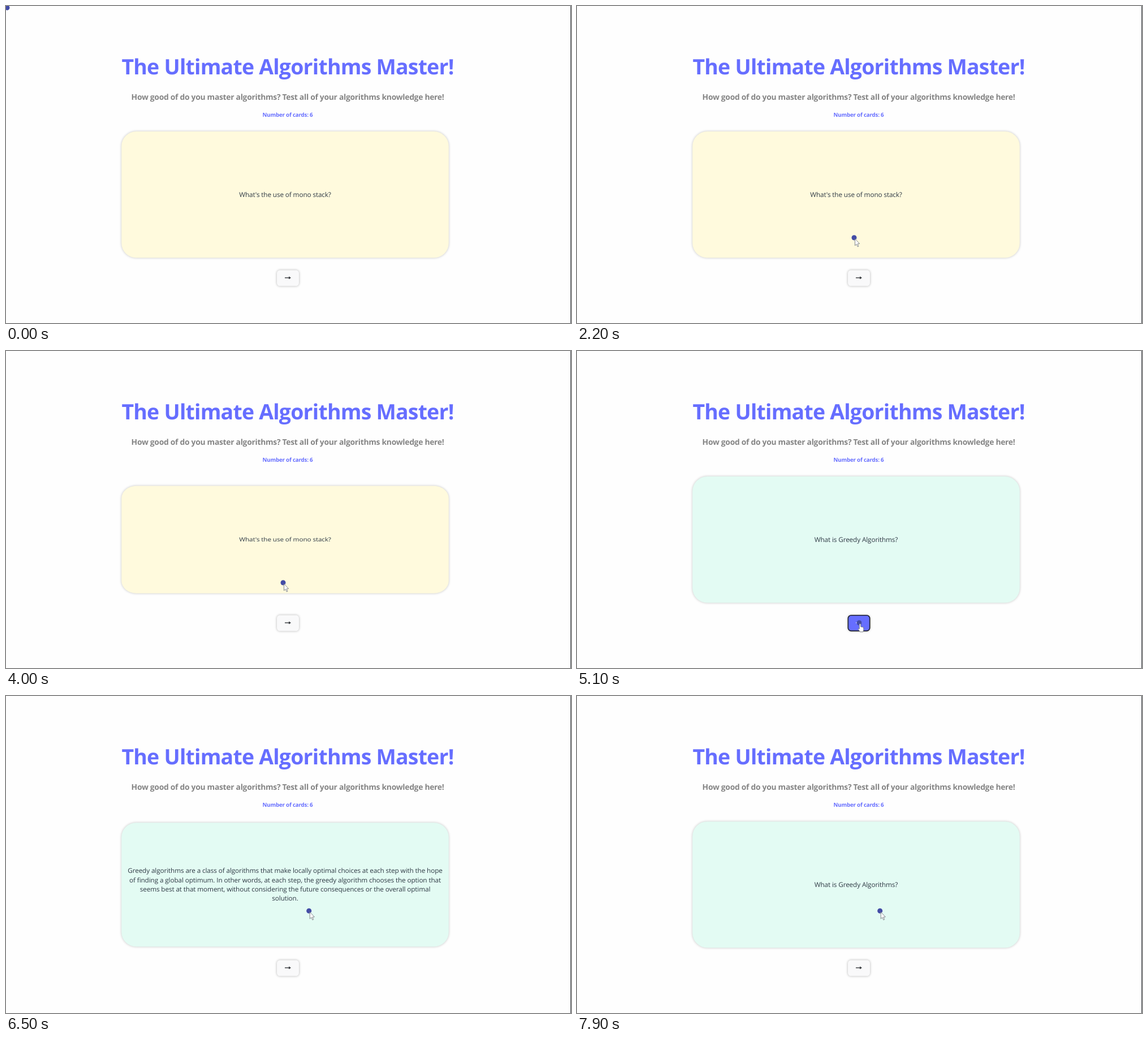
Write an HTML page with a canvas that moves like this. It is 999x561 px and loops after 8 s.

```html
<!DOCTYPE html>
<html lang="en">
<head>
<meta charset="utf-8">
<title>Flashcards</title>
<style>
html, body { margin: 0; width: 100%; height: 100%; overflow: hidden; background: #fefefe; }
canvas { display: block; width: 999px; height: 561px; }
</style>
</head>
<body>
<canvas id="stage"></canvas>
<script>
const W = 999, H = 561, LOOP = 8000, FLIP = 550, BLINK = 500;
const canvas = document.getElementById('stage');
const ctx = canvas.getContext('2d');
const dpr = window.devicePixelRatio || 1;
canvas.width = Math.round(W * dpr);
canvas.height = Math.round(H * dpr);

const FONT = '"Open Sans", "Noto Sans", sans-serif';
const PURPLE = '#666eff', INK = '#2f3a45';
const MID_X = 493.5, MID_Y = 333.8, LINE = 16.7;
const CARD_W = 578.5, CARD_H = 223.5;

// Timeline in ms
const APPEAR = 150, NEXT_CARD = 5050;
const flips = [2470, 3714, 6120, 7430];
const hovers = [[1150, 1760], [4560, 5570]];
const focus = [4780, 5950];
const moves = [
  { from: 340, to: 700, x: 631, y: 365 },
  { from: 830, to: 1320, x: 502, y: 483 },
  { from: 1690, to: 2200, x: 491.5, y: 412 },
  { from: 4320, to: 4780, x: 500.5, y: 483 },
  { from: 5540, to: 5790, x: 537.2, y: 382.3 }
];
const carets = [
  { from: 2400, to: 4700, atEnd: false },
  { from: 6980, to: 7180, atEnd: false },
  { from: 7180, to: LOOP, atEnd: true }
];

const cards = [
  {
    fill: '#fffadd',
    front: ["What's the use of mono stack?"],
    back: [
      'A monotonic stack is a data structure that can be used to solve a variety of problems involving finding',
      'the next greater element, next smaller element, or similar problems that require identifying the nearest',
      'element with some specific property. A monotonic stack is a stack that either maintains a non-',
      'decreasing or a non-increasing order of its elements.'
    ],
    backY: 278.3,
    picture: stackPicture
  },
  {
    fill: '#e3fbf3',
    front: ['What is Greedy Algorithms?'],
    back: [
      'Greedy algorithms are a class of algorithms that make locally optimal choices at each step with the hope',
      'of finding a global optimum. In other words, at each step, the greedy algorithm chooses the option that',
      'seems best at that moment, without considering the future consequences or the overall optimal',
      'solution.'
    ],
    backY: MID_Y
  }
];

const clamp = v => Math.max(0, Math.min(1, v));
const mix = (a, b, k) => a + (b - a) * k;
const easeOut = k => 1 - (1 - clamp(k)) ** 2;

// The CSS "ease" curve
function ease(x) {
  if (x <= 0 || x >= 1) return clamp(x);
  const bez = (a, b, s) => 3 * a * s * (1 - s) ** 2 + 3 * b * s * s * (1 - s) + s ** 3;
  let lo = 0, hi = 1;
  for (let i = 0; i < 24; i++) {
    const s = (lo + hi) / 2;
    if (bez(0.25, 0.25, s) < x) lo = s; else hi = s;
  }
  return bez(0.1, 1, lo);
}

function pointerAt(t) {
  if (t < APPEAR) return { x: 3.5, y: 5 };
  return moves.reduce((p, m) => {
    const k = easeOut((t - m.from) / (m.to - m.from));
    return { x: mix(p.x, m.x, k), y: mix(p.y, m.y, k) };
  }, { x: 808, y: 114 });
}

function setFont(size, weight, spacing) {
  ctx.font = `${weight} ${size}px ${FONT}`;
  ctx.letterSpacing = `${size * spacing}px`;
  ctx.textRendering = 'geometricPrecision';
  ctx.textAlign = 'center';
}

function text(str, x, y, size, color, weight = 400, spacing = -0.01) {
  setFont(size, weight, spacing);
  ctx.fillStyle = color;
  ctx.fillText(str, x, y);
}

const heading = (str, y, size, color) => text(str, 498, y, size, color, 700, -0.021);

function box(x, y, w, h, r, fill) {
  ctx.fillStyle = fill;
  ctx.beginPath();
  ctx.roundRect(x, y, w, h, r);
  ctx.fill();
}

function panel(x, y, w, h, r, fill, shade) {
  ctx.save();
  ctx.shadowColor = `rgba(0,0,0,${shade})`;
  ctx.shadowBlur = 4 * dpr;
  box(x, y, w, h, r, fill);
  ctx.restore();
}

function paragraph(lines, mid, caret) {
  const lineY = i => mid + (i - (lines.length - 1) / 2) * LINE;
  lines.forEach((s, i) => text(s, MID_X, lineY(i) + 4.2, 11.75, INK));
  if (!caret) return;
  const i = caret.atEnd ? lines.length - 1 : 0;
  const half = ctx.measureText(lines[i]).width / 2;
  box(MID_X + (caret.atEnd ? half : -half) - 0.5, lineY(i) - 7.5, 1, 15, 0, '#222');
}

function numberBar(x, y, values) {
  box(x, y, values.length * 8.7, 8.4, 0, '#1268e8');
  values.forEach((v, i) => text(v, x + (i + 0.5) * 8.7, y + 6, 4.6, '#dce9ff'));
}

// Values pile up from the bottom
function cells(cx, bottom, values, fill, ink) {
  values.forEach((v, i) => {
    const y = bottom - 4.2 - i * 6.9;
    box(cx - 6.8, y - 2.9, 13.6, 5.8, 1, fill);
    text(v, cx, y + 1.6, 4.4, ink);
  });
}

function beaker(x, bottom, values) {
  const top = bottom - Math.max(31, values.length * 6.9 + 3);
  ctx.strokeStyle = '#37659f';
  ctx.lineWidth = 1.2;
  ctx.beginPath();
  ctx.moveTo(x, top);
  ctx.arcTo(x, bottom, x + 8, bottom, 2);
  ctx.arcTo(x + 16.5, bottom, x + 16.5, top, 2);
  ctx.lineTo(x + 16.5, top);
  ctx.stroke();
  cells(x + 8.25, bottom, values, '#31c994', '#164b3b');
}

// Snapshots of an increasing stack after a number of inputs
function stackPicture() {
  const input = [2, 3, 7, 11, 5, 17, 19];
  const shots = [
    { taken: 0, x: 401.5, bottom: 389.6, barX: -3.5, barY: -45.8 },
    { taken: 4, x: 463, bottom: 417.8, barX: -3.5, barY: -46 },
    { taken: 5, x: 506, bottom: 377.2, barX: 19.5, barY: -33.4 },
    { taken: 7, x: 555, bottom: 418.4, barX: 0, barY: 0 }
  ];
  box(395, 322.8, 197, 110.9, 0, '#fff');
  text('Monotonic Stack (Increasing)', 492, 331.3, 4.4, '#333');
  for (const { taken, x, bottom, barX, barY } of shots) {
    const stack = [], popped = [];
    for (const v of input.slice(0, taken)) {
      while (stack.length && stack[stack.length - 1] > v) popped.push(stack.pop());
      stack.push(v);
    }
    numberBar(x + barX, bottom + barY, input.slice(taken));
    beaker(x, bottom, stack);
    cells(x + 26.5, bottom, popped, '#b9efdb', '#86b8a6');
  }
}

function drawCard(t) {
  const card = cards[t < NEXT_CARD ? 0 : 1];
  const turn = flips.reduce((sum, start, i) =>
    sum + (i % 2 ? -1 : 1) * ease((t - start) / FLIP), 0);
  const caret = carets.find(c =>
    t >= c.from && t < c.to && Math.floor((t - c.from) / BLINK) % 2 === 0);

  ctx.save();
  ctx.translate(0, MID_Y);
  ctx.scale(1, Math.max(0.002, Math.abs(Math.cos(Math.PI * turn))));
  ctx.translate(0, -MID_Y);
  panel(MID_X - CARD_W / 2, MID_Y - CARD_H / 2, CARD_W, CARD_H, 26, card.fill, 0.24);
  if (turn > 0.5) {
    paragraph(card.back, card.backY, caret);
    if (card.picture) card.picture();
  } else {
    paragraph(card.front, MID_Y, caret);
  }
  ctx.restore();
}

function drawButton(t) {
  const hot = hovers.reduce((sum, [a, b]) =>
    sum + ease((t - a) / 250) - ease((t - b) / 250), 0);
  const tone = (a, b) => `rgb(${a.map((v, i) => Math.round(mix(v, b[i], hot))).join()})`;
  panel(479, 467.5, 39, 28, 5.5, tone([249, 249, 250], [102, 110, 255]), 0.3);
  if (t >= focus[0] && t < focus[1]) {
    ctx.strokeStyle = '#20222c';
    ctx.lineWidth = 1.6;
    ctx.beginPath();
    ctx.roundRect(479.3, 467.8, 38.4, 27.6, 5.5);
    ctx.stroke();
  }
  const ink = tone([52, 55, 60], [225, 227, 255]);
  box(493, 480.3, 8.5, 1.4, 0, ink);
  ctx.beginPath();
  ctx.moveTo(500, 478.4);
  ctx.lineTo(504, 481);
  ctx.lineTo(500, 483.6);
  ctx.fill();
}

function arrowShape() {
  const p = new Path2D('M0 0V12L2.7 9.5L4.7 14L6.5 13.2L4.6 8.9L8.2 8.7Z');
  return p;
}

function handShape() {
  const p = new Path2D('M-1.2 9V0.5Q0 -1 1.2 0.5V5L6 6Q7 9 5.4 14H0L-3.6 9Q-3 7.6 -1.2 9Z');
  return p;
}

const ARROW = arrowShape(), HAND = handShape();

function drawPointer(t) {
  const dot = pointerAt(t - 8), tip = pointerAt(t);
  ctx.fillStyle = '#434ca6';
  ctx.beginPath();
  ctx.arc(dot.x - 1.5, dot.y - 2, 4.5, 0, Math.PI * 2);
  ctx.fill();
  if (t < APPEAR) return;
  const shape = hovers.some(([a, b]) => t >= a && t < b) ? HAND : ARROW;
  ctx.save();
  ctx.translate(tip.x, tip.y);
  ctx.fillStyle = '#fff';
  ctx.fill(shape);
  ctx.strokeStyle = '#777b80';
  ctx.lineWidth = 0.9;
  ctx.lineJoin = 'round';
  ctx.stroke(shape);
  ctx.restore();
}

function draw(t) {
  ctx.setTransform(dpr, 0, 0, dpr, 0, 0);
  box(0, 0, W, H, 0, '#fefefe');
  heading('The Ultimate Algorithms Master!', 121.3, 37.45, PURPLE);
  heading('How good of do you master algorithms? Test all of your algorithms knowledge here!',
    166, 13.88, '#858585');
  heading('Number of cards: 6', 196.4, 9.8, PURPLE);
  drawCard(t);
  drawButton(t);
  drawPointer(t);
  box(998, 0, 1, H, 0, '#3c4046');
}

const begin = performance.now();
function tick() {
  draw((performance.now() - begin) % LOOP);
  requestAnimationFrame(tick);
}
tick();
</script>
</body>
</html>
```
